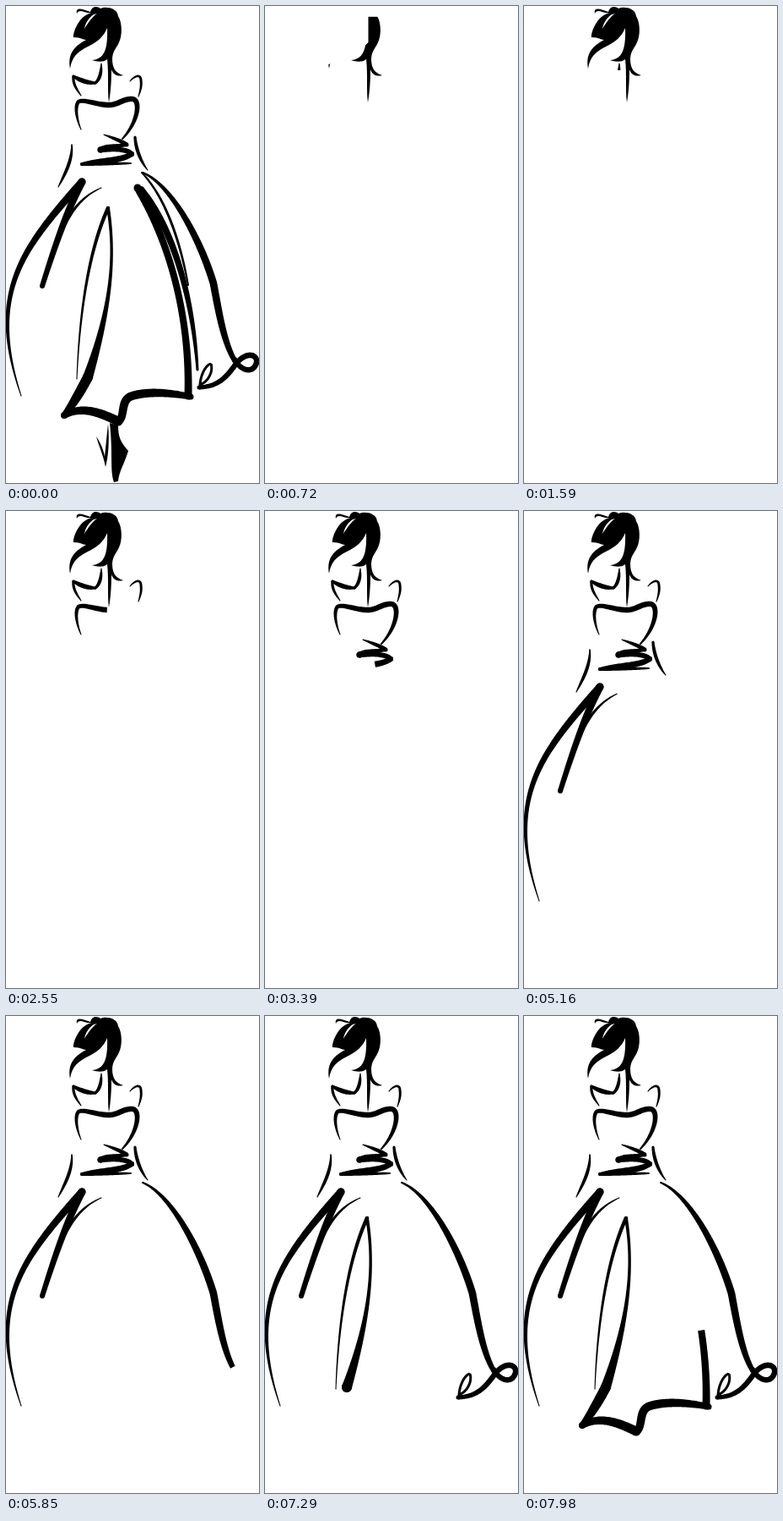
Animation of 300x564 px, one loop 8000 ms. Source, as an HTML page with a canvas:

```html
<!DOCTYPE html>
<html lang="en">
<head>
<meta charset="utf-8">
<title>Dress sketch</title>
<style>
html, body { margin: 0; width: 100%; height: 100%; overflow: hidden; background: #fff; }
canvas { display: block; width: 300px; height: 564px; }
</style>
</head>
<body>
<canvas id="stage" width="300" height="564"></canvas>
<script>
const ctx = document.getElementById('stage').getContext('2d');
const LOOP = 8000, HOLD = 120, STEP = 30, GRAIN = 1.5;
const strokes = [];

function measure(d) {
  const el = document.createElementNS('http://www.w3.org/2000/svg', 'path');
  el.setAttribute('d', d);
  return el;
}

const clamp = v => Math.max(0, Math.min(1, v));

// A brush line along a path; its width bends smoothly from head through mid to tail
function line(d, head, mid, tail) {
  const el = measure(d), len = el.getTotalLength();
  const bulge = 4 * (mid - (head + tail) / 2);
  const width = u => head + (tail - head) * u + bulge * u * (1 - u);
  const at = u => {
    const p = el.getPointAtLength(u * len);
    const a = el.getPointAtLength(u * len - 1), b = el.getPointAtLength(u * len + 1);
    const dx = b.x - a.x, dy = b.y - a.y, k = width(u) / 2 / (Math.hypot(dx, dy) || 1);
    return { x: p.x, y: p.y, r: width(u) / 2, nx: -dy * k, ny: dx * k };
  };
  return { len, at };
}

// Draws lines one after another at an even speed between two times
function sketch(start, end, ...lines) {
  const total = lines.reduce((sum, l) => sum + l.len, 0);
  let t = start;
  for (const l of lines) {
    const time = (end - start) * l.len / total;
    strokes.push({ ...l, start: t, time });
    t += time;
  }
}

function dot(p) {
  ctx.beginPath();
  ctx.arc(p.x, p.y, p.r, 0, Math.PI * 2);
  ctx.fill();
}

function drawStroke(s, t) {
  const part = clamp((t - s.start) / s.time);
  if (!part) return;
  const n = Math.ceil(part * s.len / GRAIN);
  const pts = Array.from({ length: n + 1 }, (_, i) => s.at(part * i / n));
  ctx.beginPath();
  pts.forEach(p => ctx.lineTo(p.x + p.nx, p.y + p.ny));
  pts.reverse().forEach(p => ctx.lineTo(p.x - p.nx, p.y - p.ny));
  ctx.fill();
  dot(s.at(0));
  if (part === 1) dot(s.at(1));
}

// Shoulders
sketch(1555, 1900,
  line('M113 68C113 77 112 86 106 91', 1, 4, 3),
  line('M106 91C97 91 88 88 80 83', 3, 5.5, 3),
  line('M80 83C79 93 85 100 89 106', 3, 3, 1));
sketch(1930, 2190, line('M147 89C154 81 160 81 160 88C161 95 159 101 157 107', 1, 3, 1));

// Bodice
sketch(2230, 2950, line('M89 146C84 135 81 119 86 113C93 110 108 117 122 117' +
  'C133 117 140 109 150 110C160 111 157 137 138 157', 1, 6.5, 2));

// Waist
sketch(2960, 3745,
  line('M116 152C126 156 136 159 143 164', 1, 4, 5),
  line('M143 164C132 166 120 165 112 170', 4, 5, 7),
  line('M112 170C130 168 145 170 149 175', 7, 6, 6),
  line('M149 175C138 183 110 183 90 187', 6, 7, 4),
  line('M90 187L148 186', 4, 4, 2));

// Sides
sketch(3750, 4060,
  line('M153 155C154 170 160 184 168 194', 3, 4, 1),
  line('M78 164C79 183 69 200 62 214', 1.5, 4, 1));

// Left skirt
sketch(4120, 5166,
  line('M18 461C-6 390 -3 340 25 291C43 260 70 230 90 208', 1, 6, 9),
  line('M90 208C78 232 66 258 43 331', 9, 7.5, 6),
  line('M66 266C78 240 92 224 113 215', 4, 3, 1));

// Right skirt and ribbon
sketch(5270, 5860, line('M162 197C195 210 230 275 246 328C252 360 258 397 271 419', 2, 8.5, 6));
sketch(5860, 6390,
  line('M271 418C279 432 293 435 297 422C299 411 284 408 272 424C260 441 250 450 229 451', 6, 6.5, 5),
  line('M230 450C230 437 237 424 243 423C246 432 240 443 232 447', 3, 3, 3));

// Centre fold
sketch(6390, 7405,
  line('M84 441C86 390 93 300 121 239', 1, 3, 4.5),
  line('M121 239C131 300 123 360 97 439', 4, 4.5, 12),
  line('M97 439C88 456 80 470 69 484', 12, 11, 7));

// Hem, running up into the back folds
sketch(7405, 8345,
  line('M69 484C90 472 112 481 133 491', 8, 10, 11),
  line('M134 491C141 484 136 468 147 462C165 455 195 457 219 462', 9, 10, 7),
  line('M216 461C218 380 200 290 156 215', 9, 8, 9));
sketch(8345, 9200,
  line('M160 217C200 265 222 350 227 430', 8, 7, 3),
  line('M161 197C188 225 206 275 216 330', 2, 3, 2));

const hair = new Path2D(
  'M100 7C102 0 108 0 112 3C118 0 132 2 133 12C138 20 138 35 134 43' +
  'C131 50 127 52 126 62C126 74 130 79 139 82C132 84 127 81 125 75C125 90 124 102 122 114' +
  'C120 102 122 80 120 63C115 67 108 66 102 64C116 63 121 52 120 26' +
  'C116 36 108 43 97 48C85 54 78 60 76 74C73 57 80 48 95 40C90 40 90 37 80 37' +
  'C79 31 88 8 104 8C94 10 87 2 84 9C82 0 92 4 100 7Z' +
  'M108 9C103 12 97 20 93 27C94 20 99 13 104 10Z');
const feet = new Path2D(
  'M123 493L133 496C133 508 135 515 145 526C141 540 134 550 133 562L128 563C123 548 127 530 123 493Z' +
  'M121 494C123 515 121 535 118 545C115 530 110 520 107 509C113 518 116 526 117 533Z');

// Brush route that uncovers the hair
const routes = [
  { start: 120, end: 900, d: 'M122 114V70L139 82L125 62L104 64L119 57L130 46V3L124 22V45' },
  { start: 900, end: 1560, d: 'M120 5L116 32L106 3V38L94 40L101 16L82 34L90 18L84 5L104 6L114 34L95 46L75 74' }
].map(r => ({ ...r, path: new Path2D(r.d), len: measure(r.d).getTotalLength() }));

function drawHair(t) {
  if (t >= 1560) return ctx.fill(hair, 'evenodd');
  ctx.save();
  ctx.clip(hair, 'evenodd');
  ctx.lineWidth = 15;
  for (const r of routes) {
    const part = clamp((t - r.start) / (r.end - r.start));
    if (!part) continue;
    ctx.setLineDash([part * r.len, r.len * 2]);
    ctx.stroke(r.path);
  }
  ctx.restore();
}

function draw(now) {
  const ms = now % LOOP;
  const done = ms < HOLD;
  const t = done ? Infinity : Math.floor(ms / STEP) * STEP;
  ctx.fillStyle = '#fff';
  ctx.fillRect(0, 0, 300, 564);
  ctx.fillStyle = ctx.strokeStyle = '#000';
  drawHair(t);
  strokes.forEach(s => drawStroke(s, t));
  if (done) ctx.fill(feet);
}

const begin = performance.now();
function tick() {
  draw(performance.now() - begin);
  requestAnimationFrame(tick);
}
tick();
</script>
</body>
</html>
```
